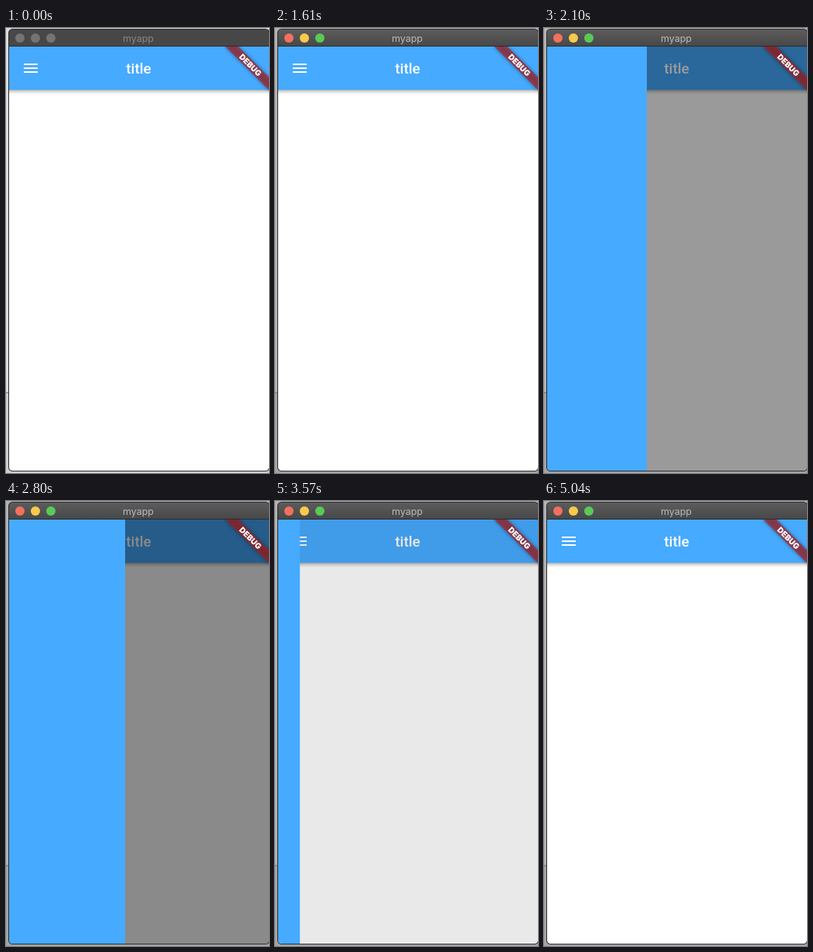
Write an HTML page that moves like this. It is 340 by 576 pixels and loops after 5.11 s.

```html
<!DOCTYPE html>
<html lang="en">
<head>
<meta charset="utf-8">
<title>Drawer demo</title>
<style>
  html, body { margin: 0; width: 100%; height: 100%; overflow: hidden; }
  svg { display: block; width: 340px; height: 576px; }
  text { text-anchor: middle; }

  .desk { fill: #b3b3b3; }
  .desk-low { fill: #a4a4a4; }
  .bar { fill: url(#chrome); }
  .name { fill: #b9b9b9; font: 12.5px Inter, sans-serif; }
  .red { fill: #f3705f; }
  .yellow { fill: #f8ca4d; }
  .green { fill: #5ac957; }

  .idle .desk { fill: #dcdcdc; }
  .idle .desk-low { fill: #cfcfcf; }
  .idle .bar { fill: #474747; }
  .idle .name { fill: #868686; }
  .idle .lights circle { fill: #747474; }

  .blue { fill: #46aaff; }
  .title { fill: #fff; font: 500 19px Roboto, sans-serif; }
  .debug { fill: #fff; font: 900 10.2px Inter, sans-serif; }
</style>
</head>
<body>
<svg id="stage" class="idle" viewBox="0 0 340 576">
  <defs>
    <linearGradient id="chrome" x2="0" y2="1">
      <stop stop-color="#5c5c5c"/>
      <stop offset="1" stop-color="#484848"/>
    </linearGradient>
    <linearGradient id="shade" x2="0" y2="1">
      <stop stop-opacity=".3"/>
      <stop offset=".45" stop-opacity=".12"/>
      <stop offset="1" stop-opacity="0"/>
    </linearGradient>
    <filter id="soft" x="-20%" y="-80%" width="140%" height="260%">
      <feGaussianBlur stdDeviation="2.5"/>
    </filter>
    <clipPath id="window"><rect x="4" y="2" width="336" height="571" rx="4.5"/></clipPath>
    <clipPath id="page"><rect x="4" y="24" width="336" height="549"/></clipPath>
    <clipPath id="header"><rect x="4" y="24" width="336" height="56"/></clipPath>
  </defs>

  <rect class="desk" width="340" height="576"/>
  <rect class="desk-low" y="472" width="340" height="104"/>
  <path d="M0 472H3" stroke="#666"/>
  <rect x="3" y="1" width="338" height="573" rx="5.5" fill="#2c2c2c"/>

  <g clip-path="url(#window)">
    <rect class="bar" x="4" y="2" width="336" height="21"/>
    <text class="name" x="171" y="18">myapp</text>
    <g class="lights">
      <circle class="red" cx="18" cy="13" r="6"/>
      <circle class="yellow" cx="38" cy="13" r="6"/>
      <circle class="green" cx="58" cy="13" r="6"/>
    </g>

    <g clip-path="url(#page)">
      <rect x="4" y="24" width="336" height="549" fill="#fff"/>
      <rect x="4" y="80" width="336" height="6" fill="url(#shade)"/>
      <rect class="blue" x="4" y="24" width="336" height="56"/>
      <g clip-path="url(#header)">
        <circle id="ripple" cx="31.5" cy="52" r="0" fill="#aab9aa"/>
      </g>
      <path d="M23 47H41M23 52H41M23 57H41" stroke="#fff" stroke-width="2"/>
      <text class="title" x="171.5" y="59">title</text>
      <rect id="scrim" x="4" y="24" width="336" height="549" opacity="0"/>
      <rect id="drawer" class="blue" x="4" y="24" width="0" height="549"/>
      <g transform="translate(340 24) rotate(45)">
        <rect x="-40" y="28" width="80" height="12" opacity=".4" filter="url(#soft)"/>
        <rect x="-40" y="28" width="80" height="12" fill="#b71c1c" fill-opacity=".63"/>
        <text class="debug" y="37.7">DEBUG</text>
      </g>
    </g>
  </g>
</svg>
<script>
  const LOOP = 5110, STEP = 70;
  const FOCUS = 700, PRESS = 1680, OPEN = 1918, CLOSE = 3389;
  const DRAWER = 150, DIM = 0.46;
  const $ = id => document.getElementById(id);
  const set = (id, attrs) => {
    for (const key in attrs) $(id).setAttribute(key, attrs[key]);
  };

  // Critically damped spring from 0 to 1; rate is per second.
  function spring(ms, rate) {
    const u = Math.max(0, ms) * rate / 1000;
    const x = 1 - (1 + u) * Math.exp(-u);
    return x > 0.988 ? 1 : x;
  }

  function draw(t) {
    $('stage').classList.toggle('idle', t < FOCUS);

    const open = t < CLOSE ? spring(t - OPEN, 19) : 1 - spring(t - CLOSE, 17);
    set('drawer', { width: DRAWER * open });
    set('scrim', { opacity: DIM * open });

    const held = t - PRESS;
    const pressed = held >= 0 && held < 420;
    set('ripple', {
      r: pressed ? 8 + 26 * Math.min(1, held / 280) : 0,
      opacity: 0.3 * Math.min(1, (held + STEP) / 200)
    });
  }

  const start = performance.now();
  function tick() {
    const t = (performance.now() - start) % LOOP;
    draw(Math.floor(t / STEP) * STEP);
    requestAnimationFrame(tick);
  }
  tick();
</script>
</body>
</html>
```
